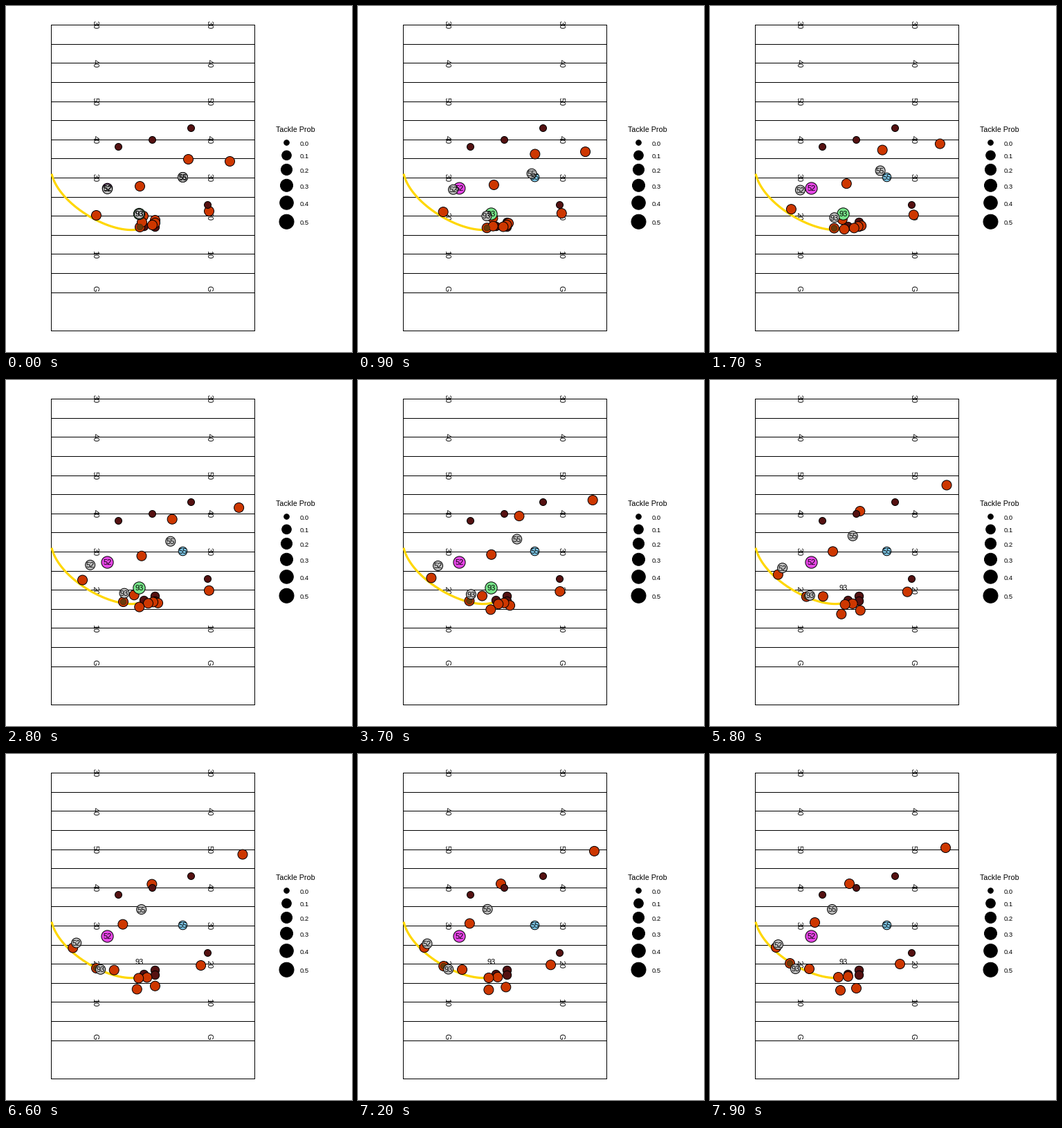
Animation, 500 px wide and 500 px high, one loop 8 s. Source, as a matplotlib script:

```python
import numpy as np
import matplotlib.pyplot as plt
from matplotlib.animation import FuncAnimation
from matplotlib.patches import Circle

SIZE, FRAMES, STEP = 500, 80, 100
PT = 0.72  # points per pixel at 100 dpi
ORANGE, MAROON, GREY = "#CD3700", "#551111", "#BEBEBE"
LEFT, RIGHT, TOP, BOTTOM = 65, 359, 27, 469
GAP = (BOTTOM - TOP) / 16
GROW, GONE = 1.0, 5.2  # seconds: spots reach full size, "93" spot vanishes

plt.rcParams["font.family"] = "Liberation Sans"
fig = plt.figure(figsize=(5, 5), dpi=100, facecolor="white")
ax = fig.add_axes([0, 0, 1, 1])
ax.set_xlim(-0.5, SIZE - 0.5)
ax.set_ylim(SIZE - 0.5, -0.5)
ax.axis("off")

# Each player runs a Bezier curve: start, control, end
RUNNER = (193, 319), (162, 326), (115, 302)
BLOCKERS = [
    [(323, 224), (347, 161), (340, 135)],
    [(263, 221), (229, 186), (201, 187)],
    [(193, 260), (210, 251), (151, 243)],
    [(130, 302), (96, 279), (95, 279)],
    [(293, 296), (298, 311), (274, 303)],
    RUNNER,
    [(198, 303), (184, 317), (143, 310)],
    [(215, 309), (225, 329), (211, 338)],
    [(215, 313), (213, 327), (199, 321)],
    [(211, 316), (205, 328), (185, 322)],
    [(196, 312), (190, 338), (188, 341)],
]
TACKLERS = {
    "52": [(146, 264), (105, 267), (98, 275)],
    "55": [(255, 247), (238, 222), (176, 224)],
    "93": [(192, 300), (164, 314), (123, 310)],
}
# Starting spots: place, colour, first and full radius
SPOTS = {
    "52": ((146, 263), "#E646E6", 7.3, 8.6),
    "55": ((255, 247), "#7EC8E8", 7.0, 6.3),
    "93": ((192, 300), "#78E58A", 8.2, 8.7),
}


def bezier(points, u):
    pts = np.array(points, float)
    while len(pts) > 1:
        pts = pts[:-1] * (1 - u) + pts[1:] * u
    return pts[0]


def dot(x, y, r, color, z, edge="black"):
    return ax.add_patch(Circle((x, y), r, fc=color, ec=edge, lw=PT, zorder=z))


def label(x, y, s, px, ha="center"):
    return ax.text(x, y + 0.36 * px, s, fontsize=px * PT, ha=ha,
                   va="baseline", zorder=9)


def stroke(xs, ys):
    # Half a pixel back, so that snapping lands on the wanted row
    ax.plot(np.subtract(xs, 0.5), np.subtract(ys, 0.5), color="black", lw=PT,
            antialiased=False, zorder=1, solid_capstyle="projecting")


# Field
for k in [*range(15), 16]:
    y = round(TOP + k * GAP)
    stroke([LEFT, RIGHT], [y, y])
for x in (LEFT, RIGHT):
    stroke([x, x], [TOP, BOTTOM])
for k, name in enumerate(["30", "40", "50", "40", "30", "20", "10", "G"]):
    y = TOP + 2 * k * GAP - (5.5 if name == "G" else 0)
    for x in (128, 293):
        ax.text(x, y, name, fontsize=11 * PT, rotation=-90,
                ha="center", va="center", zorder=2)

# Run path
path = [bezier([(65.5, 242), (76, 288), (157, 333.5), (195, 321)], u)
        for u in np.linspace(0, 1, 40)]
ax.plot(*np.transpose(path), color="#FFD700", lw=3.2 * PT,
        solid_capstyle="butt", zorder=3)

# Legend, dot area grows with probability
label(390, 178, "Tackle Prob", 10.7, "left")
for k in range(6):
    y = 197 + 17.2 * k + 1.13 * k * k
    dot(405, y, 3.8 + 6.7 * np.sqrt(k / 5), "black", 4)
    label(424, y + 1, f"0.{k}", 9.5, "left")

# Players who stay put
for x, y in [(199, 318), (215, 312), (215, 319)]:
    dot(x, y, 6.2, MAROON, 4)
for x, y in [(162, 203), (211, 193), (267, 176), (291, 287)]:
    dot(x, y, 5, MAROON, 6)

# Players on the move
movers = [(dot(0, 0, 7, ORANGE, 5), run) for run in BLOCKERS]
movers.append((dot(0, 0, 4.3, "#6B3A0A", 5.5, "#5A3008"), RUNNER))
spots, tags = {}, []
for num, (spot, color, r, _) in SPOTS.items():
    spots[num] = dot(*spot, r, color, 7)
    label(*spot, num, 11)
for num, run in TACKLERS.items():
    movers.append((dot(0, 0, 7, GREY, 8), run))
    tags.append((label(0, 0, num, 11), run))


def update(n):
    t, u = n * STEP / 1000, n / (FRAMES - 1)
    for patch, run in movers:
        patch.center = bezier(run, u)
    for text, run in tags:
        text.set_position(bezier(run, u) + (0, 4))
    for num, patch in spots.items():
        patch.set_radius(np.interp(t, [0, GROW], SPOTS[num][2:]))
    spots["93"].set_visible(t < GONE)
    return []


anim = FuncAnimation(fig, update, frames=FRAMES, interval=STEP,
                     repeat=True, repeat_delay=0, blit=False)
plt.show()
```
